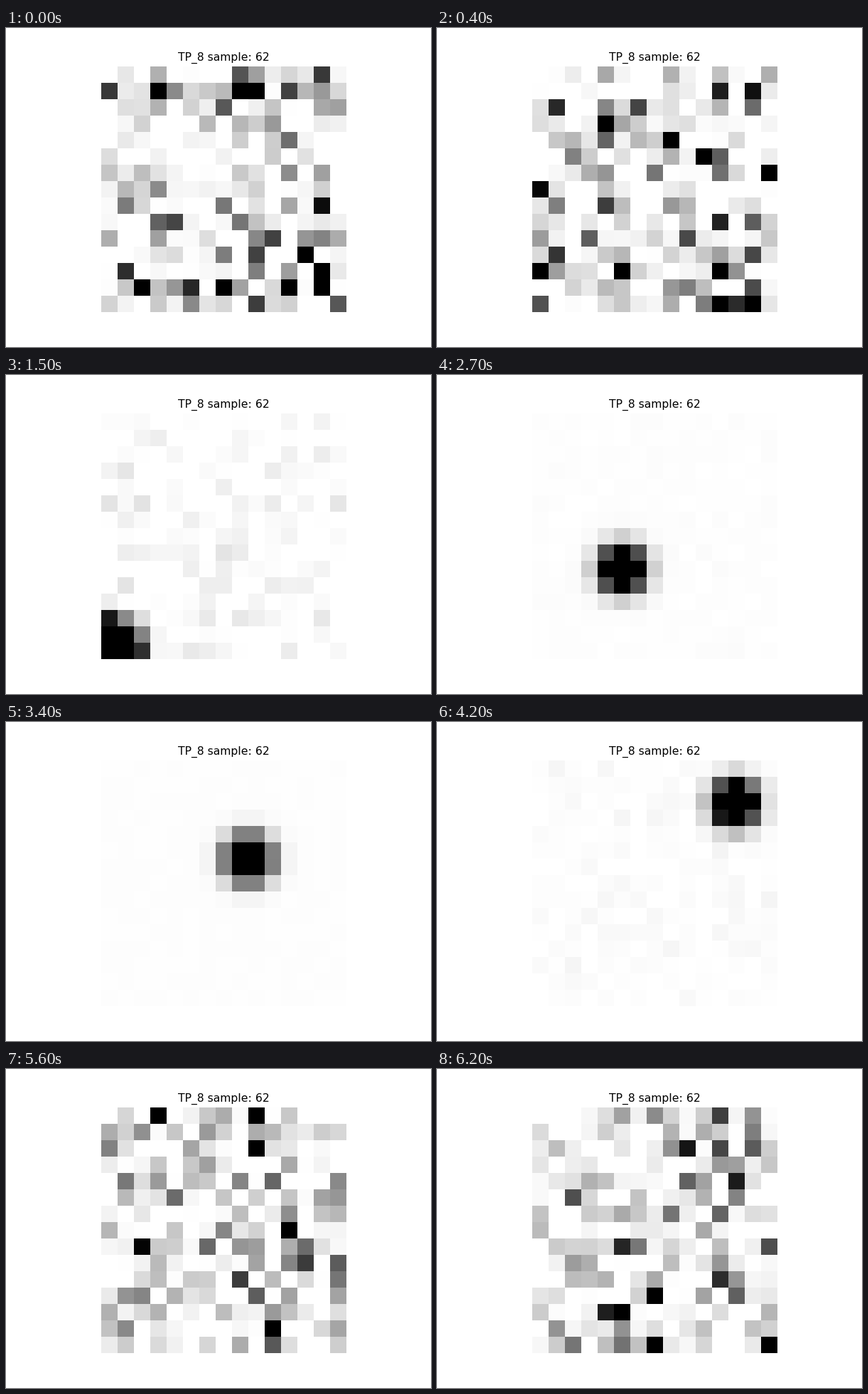
A matplotlib script that plays this animation: 598x448 px, repeating every 6300 ms.

```python
import matplotlib.pyplot as plt
import numpy as np
from matplotlib.animation import FuncAnimation

WIDTH, HEIGHT, DPI = 598, 448, 64
FRAMES, INTERVAL = 63, 100
GRID = 15
BLOB_START, BLOB_END = 15, 48
HELD = {17, 37, 47}          # steps that repeat the previous picture
SPREAD = 1.5                 # twice the variance of the blob, in cells

rows, cols = np.mgrid[:GRID, :GRID]


def normal_grid(step):
    return np.random.default_rng(620 + step).standard_normal((GRID, GRID))


def noise_only(step):
    """Mostly pale cells with a thin tail of dark ones."""
    return 0.22 * normal_grid(step) ** 2 - 0.03


def moving_blob(step):
    """A Gaussian spot crossing the grid from bottom left to top right."""
    pos = np.interp(step, [17, 36, 37, 46], [0, 9.5, 9.5, 13.8])
    gain = 2.58 + 10.4 * np.exp(-1.2 * (step - BLOB_START))
    dist2 = (cols - pos) ** 2 + (rows - (GRID - 1 - pos)) ** 2
    # The background calms down towards the middle of the crossing.
    sigma = 0.04 * ((step - 32) / 17) ** 2
    return 0.008 + gain * np.exp(-dist2 / SPREAD) + sigma * normal_grid(step)


def shade_at(step):
    if step in HELD:
        step -= 1
    draw = moving_blob if BLOB_START <= step < BLOB_END else noise_only
    return np.clip(draw(step), 0, 1)


fig, ax = plt.subplots(figsize=(WIDTH / DPI, HEIGHT / DPI), dpi=DPI,
                       facecolor="white")
ax.set_axis_off()
ax.set_title("TP_8 sample: 62", fontname="DejaVu Sans", fontsize=17.6,
             x=0.4985, pad=9)
image = ax.imshow(shade_at(0), cmap="gray_r", vmin=0, vmax=1,
                  interpolation="nearest")


def update(step):
    image.set_data(shade_at(step))
    return [image]


animation = FuncAnimation(fig, update, frames=FRAMES, interval=INTERVAL,
                          repeat=True, repeat_delay=0)
plt.show()
```
